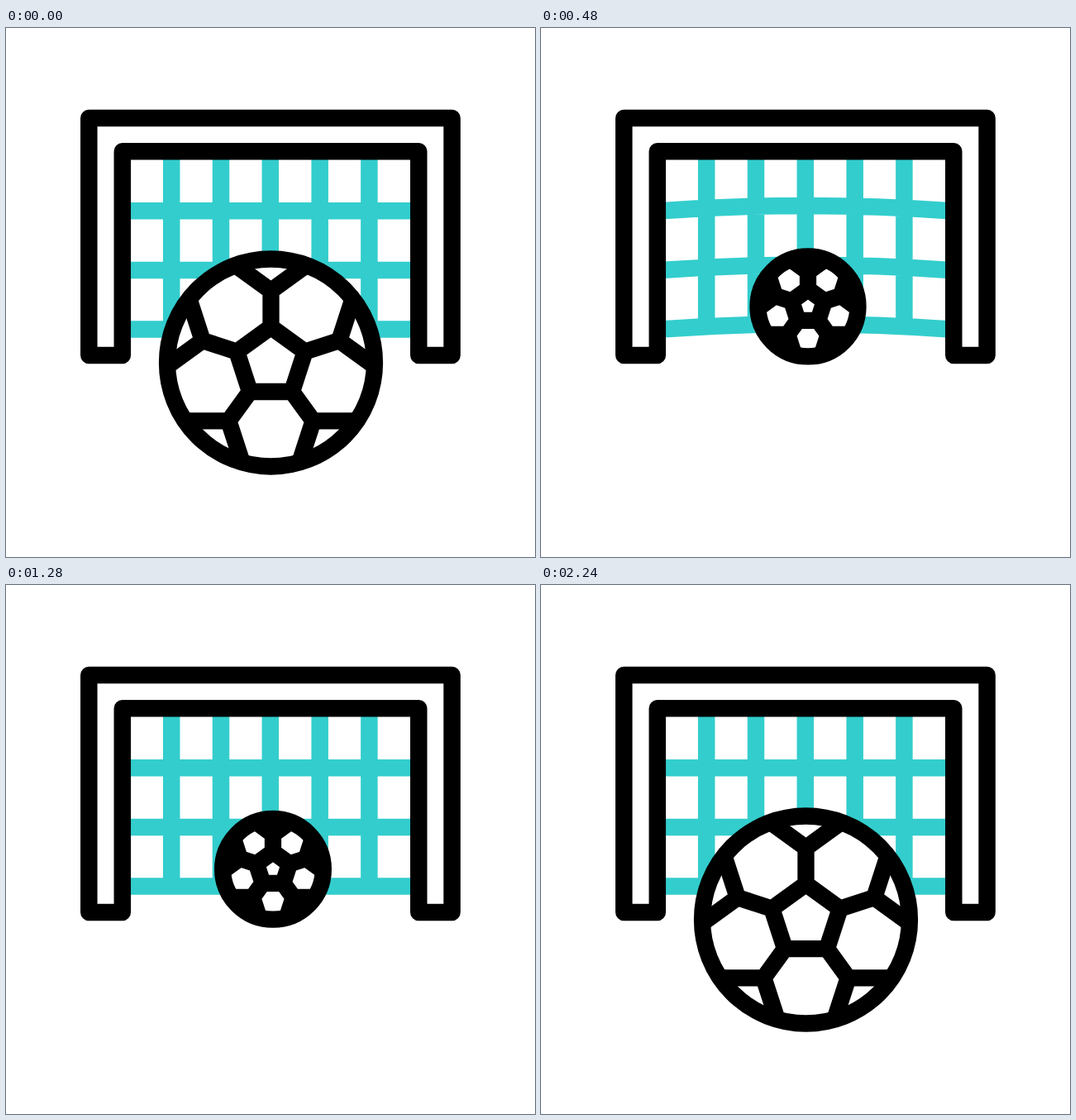
Recreate the animation shown at these times as an HTML page. Size 640 by 640 pixels, loop 2400 ms.

```html
<!DOCTYPE html>
<html lang="en">
<head>
<meta charset="utf-8">
<title>Goal</title>
<style>
  html, body { margin: 0; width: 100%; height: 100%; overflow: hidden; background: #fff; }
  svg { display: block; width: 100vw; height: 100vh; }
  .line { fill: none; stroke-width: 20.5; }
  .teal { stroke: #33cdcd; }
  .ink { stroke: #000; }
</style>
</head>
<body>
<svg viewBox="0 0 640 640">
  <path id="net" class="line teal"/>
  <path id="rays" class="line teal" stroke-linecap="round"/>
  <g id="ball" fill="#fff" stroke="#000">
    <circle r="125.5"/>
    <path id="seams" fill="none"/>
  </g>
  <path class="line ink" stroke-linejoin="round"
        d="M100.3 109H539.6V396H499.3V149.3H140.8V396H100.3Z"/>
</svg>
<script>
const LOOP = 2400;
const $ = id => document.getElementById(id);

// Cubic Bezier easing with end heights 0 and 1
function bezier(x1, x2) {
  return x => {
    let lo = 0, hi = 1;
    for (let i = 0; i < 24; i++) {
      const s = (lo + hi) / 2, r = 1 - s;
      if (3 * r * r * s * x1 + 3 * r * s * s * x2 + s * s * s < x) lo = s;
      else hi = s;
    }
    return lo * lo * (3 - 2 * lo);
  };
}

const smooth = bezier(1 / 3, 2 / 3);
const settle = bezier(0.33, 0.2);

// Steps: time, values..., with the easing that leads into the step
const ballSteps = [
  { t: 0, v: [320.5, 405, 1] },
  { t: 200, v: [323, 229.5, 0.482] },
  { t: 529, v: [323, 343.5, 0.482] },
  { t: 940, v: [323, 315, 0.482] },
  { t: 1200, v: [323, 343.5, 0.482] },
  { t: 1240, v: [323, 343.5, 0.482] },
  { t: 2240, v: [320.5, 405, 1], ease: settle }
];
const netSteps = [
  { t: 80, v: [0] },
  { t: 200, v: [21.4] },
  { t: 640, v: [0] }
];

function at(steps, t) {
  if (t <= steps[0].t) return steps[0].v;
  const i = steps.findIndex(s => s.t > t);
  if (i < 0) return steps[steps.length - 1].v;
  const a = steps[i - 1], b = steps[i];
  const p = (b.ease || smooth)((t - a.t) / (b.t - a.t));
  return a.v.map((v, k) => v + (b.v[k] - v) * p);
}

// Five-fold seams: pentagon, spokes and the forks that meet the rim
function seamPath() {
  const turn = (x, y, k) => {
    const a = k * Math.PI * 0.4, c = Math.cos(a), s = Math.sin(a);
    return (x * c - y * s).toFixed(2) + ' ' + (x * s + y * c).toFixed(2);
  };
  let d = 'M' + [0, 1, 2, 3, 4].map(k => turn(0, -43.3, k)).join('L') + 'Z';
  for (let k = 0; k < 5; k++) {
    d += `M${turn(0, -43.3, k)}L${turn(0, -87, k)}`;
    d += `M${turn(-42.7, -118, k)}L${turn(0, -87, k)}L${turn(42.7, -118, k)}`;
  }
  return d;
}

function netPath(bulge) {
  const left = 145, right = 495, mid = 320, low = 364.5;
  let d = '';
  for (const y of [221.3, 293, low])
    d += `M${left} ${y}Q${mid} ${y - 2 * bulge} ${right} ${y}`;
  for (const x of [200.2, 260, 319.8, 379.7, 439.4]) {
    const u = (x - mid) / (right - mid);
    d += `M${x} 150V${low - bulge * (1 - u * u)}`;
  }
  return d;
}

const rays = [
  [305.5, 415, 258.5, 429],
  [321.5, 425, 321.5, 473],
  [338.5, 411.7, 382.5, 431]
];

function rayPath(t) {
  const clamp = p => Math.min(1, Math.max(0, p));
  const head = clamp((t - 540) / 140), tail = clamp((t - 590) / 140);
  if (head <= tail) return '';
  return rays.map(([x1, y1, x2, y2]) => {
    const point = p => `${x1 + (x2 - x1) * p} ${y1 + (y2 - y1) * p}`;
    return `M${point(tail)}L${point(head)}`;
  }).join('');
}

function draw(now) {
  const t = now % LOOP;
  const [x, y, scale] = at(ballSteps, t);
  $('ball').setAttribute('transform', `translate(${x} ${y}) scale(${scale})`);
  $('ball').setAttribute('stroke-width', 20.3 / scale);
  $('net').setAttribute('d', netPath(at(netSteps, t)[0]));
  $('rays').setAttribute('d', rayPath(t));
}

$('seams').setAttribute('d', seamPath());
const start = performance.now();
function tick() {
  draw(performance.now() - start);
  requestAnimationFrame(tick);
}
tick();
</script>
</body>
</html>
```
